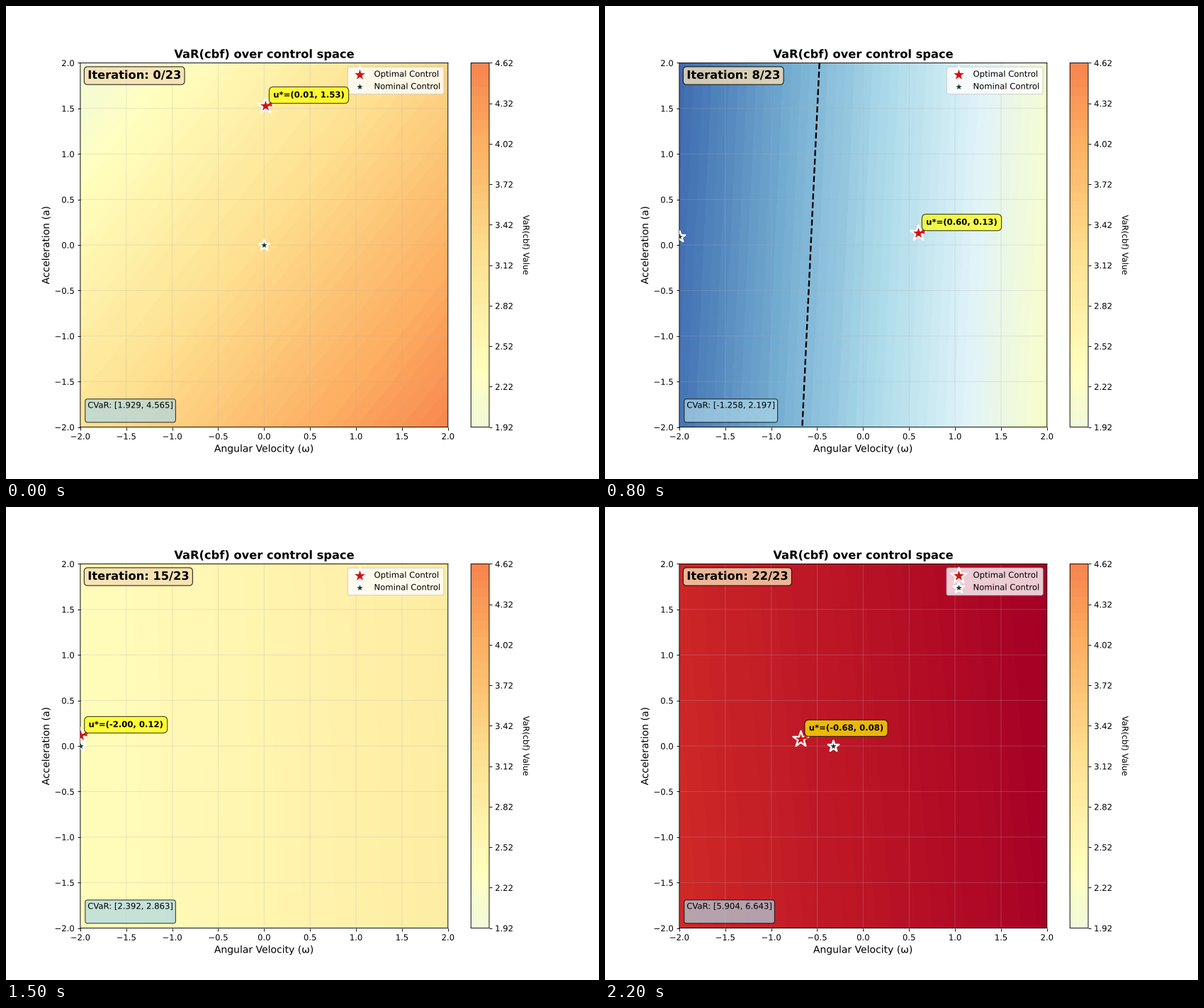
A matplotlib script that plays this animation: 837x669 px, repeating every 2300 ms.

```python
import numpy as np
import matplotlib.pyplot as plt
from matplotlib.animation import FuncAnimation
from matplotlib.patheffects import Normal

plt.rcParams.update({
    "font.family": "DejaVu Sans",
    "text.hinting": "none",
    "path.snap": False,
})

FRAMES = 23
LAST = FRAMES - 1
VMIN, VMAX = -1.971, 6.643
OPT_COLOR, NOM_COLOR = "#d41212", "#1c3a2c"

# Turning points of the surface range: step, low, high.
RANGE = np.array([
    (0, 1.929, 4.565), (3, -1.650, 4.107), (6, -1.971, 2.720),
    (10, -0.545, 1.673), (15, 2.392, 2.863), (19, 4.672, 5.153),
    (22, 5.904, 6.643),
])

axis = np.linspace(-2, 2, 50)
X, Y = np.meshgrid(axis, axis)

fig, ax = plt.subplots(figsize=(10, 7.9931), dpi=83.7)
fig.subplots_adjust(left=0.1253, right=0.9003, bottom=0.1097, top=0.8797)


def field(i):
    """Linear risk surface; its contours straighten up over time."""
    step, lows, highs = RANGE.T
    low, high = np.interp(i, step, lows), np.interp(i, step, highs)
    lean = 0.8 / (1 + i) - i / 190
    slope = (high - low) / (4 * (1 + abs(lean)))
    return (low + high) / 2 + slope * (X - lean * Y), low, high


def optimal(i):
    """Settle right of centre, fall to the left limit, then return."""
    settle = min(0.01 + 0.22 * i, 0.71 - 0.013 * i - 0.08 * (i / 10) ** 9)
    x = max(-2, settle, -0.68 - 0.44 * (LAST - i))
    rise = 0.22 - 0.67 * (max(10 - i, 0) / 7) ** 1.62
    y = max(1.53 - 0.66 * i, min(rise, 0.432 - 0.021 * i),
            0.08 - 0.05 * (LAST - i))
    return x, y


def nominal(i):
    """Speed up to the left limit, wait, and come back evenly."""
    x = max(-2, -0.113 * i ** 1.6, -0.33 - 0.42 * (LAST - i))
    return x, 0.31 * np.exp(-((i - 6) / 1.8) ** 2)


def fill(z):
    return ax.contourf(X, Y, z, levels=50, cmap="RdYlBu_r",
                       vmin=VMIN, vmax=VMAX)


def star(pos, size, color, label, zorder):
    ax.scatter(*pos, s=size, marker="*", color=color, edgecolors="white",
               linewidths=2, label=label, zorder=zorder)


def note(y, text, va, color, alpha, **font):
    ax.text(0.02, y, text, transform=ax.transAxes, va=va, linespacing=1.3,
            bbox=dict(boxstyle="round", facecolor=color, alpha=alpha), **font)


def draw(i):
    ax.clear()
    z, low, high = field(i)
    fill(z)
    if low < 0 < high:
        ax.contour(X, Y, z, levels=[0], colors="black",
                   linewidths=2, linestyles="--")

    best = optimal(i)
    star(best, 400, OPT_COLOR, "Optimal Control", 10)
    star(nominal(i), 200, NOM_COLOR, "Nominal Control", 9)
    ax.annotate("u*=({:.2f}, {:.2f})".format(*best), best, xytext=(10, 10),
                textcoords="offset points", fontsize=10, fontweight="bold",
                zorder=11,
                bbox=dict(boxstyle="round,pad=0.5", facecolor="yellow",
                          alpha=0.7),
                arrowprops=dict(arrowstyle="->", color=OPT_COLOR, lw=1.5))

    note(0.98, f"Iteration: {i}/{FRAMES}", "top", "wheat", 0.8,
         fontsize=14, fontweight="bold")
    note(0.02, f"CVaR: [{low:.3f}, {high:.3f}]\n", "bottom",
         "lightblue", 0.7, fontsize=10)

    ax.set(xlim=(-2, 2), ylim=(-2, 2))
    ax.set_xlabel("Angular Velocity (ω)", fontsize=12)
    ax.set_ylabel("Acceleration (a)", fontsize=12)
    ax.set_title("VaR(cbf) over control space", fontsize=14,
                 fontweight="bold")
    ax.grid(True, alpha=0.3)
    ax.legend(loc="upper right", fontsize=10)

    # Draw text as outlines, so that it is not rounded to whole pixels.
    for text in fig.findobj(plt.Text):
        text.set_path_effects([Normal()])
    return []


# The colour scale is fixed by the first surface.
bar = fig.colorbar(fill(field(0)[0]), ax=ax)
bar.set_label("VaR(cbf) Value", rotation=270, labelpad=20)

anim = FuncAnimation(fig, draw, frames=FRAMES, interval=100,
                     repeat=True, repeat_delay=0, blit=False)
plt.show()
```
